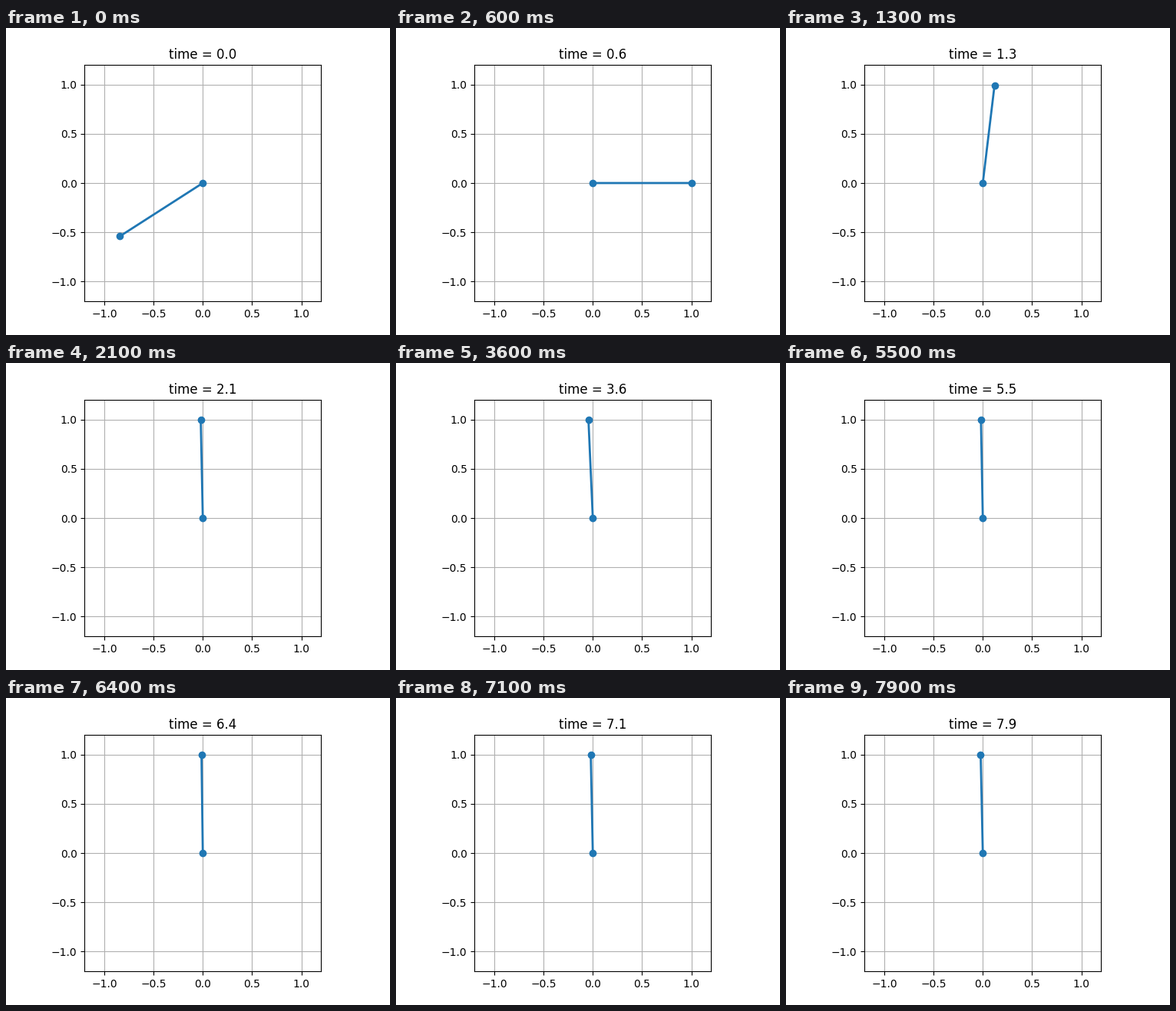
These frames come from a looping animation (500 by 400 pixels, 8000 ms). A matplotlib script:

```python
import numpy as np
import matplotlib.pyplot as plt
from matplotlib.animation import FuncAnimation

DT = 0.1
FRAMES = 80
REST = 0.0287      # small lean left of upright
RIPPLE = 0.0156    # amplitude of the balancing wobble
RATE = 3.68

# Swing-up: angle from straight down, one value per time step
SWING = [-1.0, -0.82, -0.37, 0.14, 0.65, 1.13, 1.571, 1.95, 2.27]
SWING_END = DT * len(SWING)


def tip_angle(step):
    """Angle from straight down, counterclockwise."""
    if step < len(SWING):
        return SWING[step]
    t = step * DT
    settle = 0.645 * np.exp(-RATE * (t - SWING_END))
    ramp = np.clip((t - 2.7) / 0.7, 0, 1)
    wobble = RIPPLE * ramp * np.sin(np.radians(79 + 445 * (t - 6.4)))
    return np.pi + REST - settle - wobble


fig, ax = plt.subplots(figsize=(5, 4), dpi=100)
ax.set_aspect("equal")
ax.set_xlim(-1.2, 1.2)
ax.set_ylim(-1.2, 1.2)
ax.set_xticks(np.arange(-1, 1.1, 0.5))
ax.set_yticks(np.arange(-1, 1.1, 0.5))
ax.grid()
rod, = ax.plot([], [], "o-", lw=2)
title = ax.set_title("")


def update(step):
    a = tip_angle(step)
    rod.set_data([0, np.sin(a)], [0, -np.cos(a)])
    title.set_text(f"time = {step * DT:.1f}")
    return rod, title


anim = FuncAnimation(fig, update, frames=FRAMES, interval=1000 * DT,
                     repeat=True, repeat_delay=0, blit=False)
plt.show()
```
